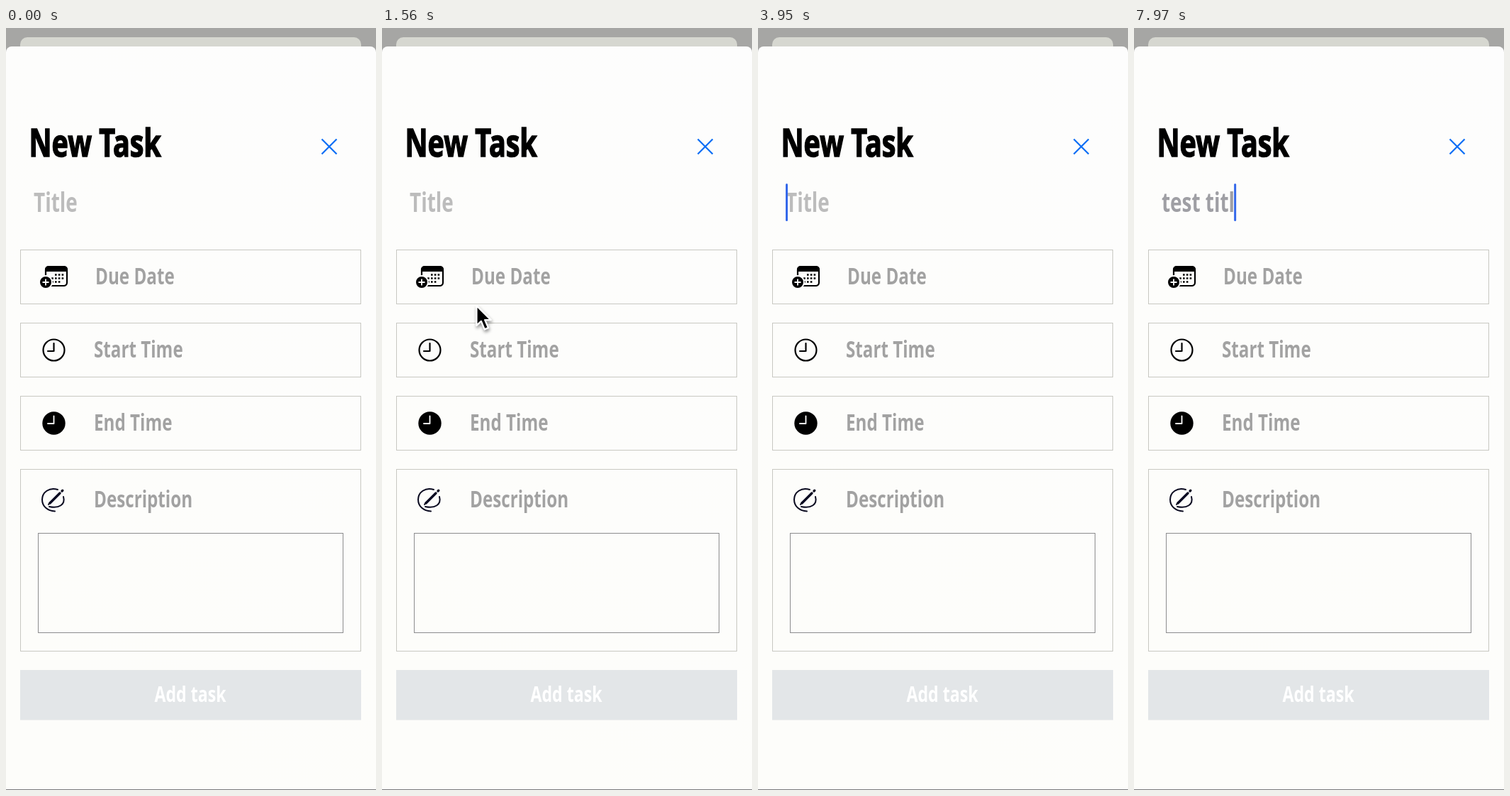
Recreate the animation shown at these times as an HTML page. Size 522 px wide and 1073 px high, loop 7.99 s.

```html
<!DOCTYPE html>
<html lang="en">
<head>
<meta charset="utf-8">
<title>New Task</title>
<style>
  html, body { margin: 0; width: 100%; height: 100%; overflow: hidden; background: #fdfdfd; }
  svg { display: block; width: 100%; height: 100%; }
  /* one condensed look shared by all type */
  text {
    font-family: "Noto Sans", "Open Sans", sans-serif;
    font-weight: 600;
    white-space: pre;
    transform: scaleX(.745);
    transform-box: fill-box;
    transform-origin: left;
  }
  .heading { font-size: 53px; font-weight: 800; stroke: #000; stroke-width: 1.6; }
  .field { font-size: 37.5px; }
  .label { font-size: 32.5px; fill: #a2a2a2; }
  .action { font-size: 31px; font-weight: 700; fill: #fff; text-anchor: middle; transform-origin: center; }
  .box { fill: none; stroke: #c8c8c2; }
  .line { fill: none; stroke: #000; stroke-width: 2.2; stroke-linecap: round; stroke-linejoin: round; }
  #pointer path { stroke: #fff; stroke-width: 2.4; stroke-linejoin: round; filter: drop-shadow(1px 3px 2px #0006); }
</style>
</head>
<body>
<svg viewBox="0 0 522 1073" preserveAspectRatio="none">
  <defs>
    <linearGradient id="sheet" x1="1" y1="0" x2=".6" y2="1">
      <stop offset="0" stop-color="#fdfdfd"/>
      <stop offset="1" stop-color="#fdfdfa"/>
    </linearGradient>
  </defs>

  <rect width="522" height="1073" fill="#a6a6a4"/>
  <rect x="20" y="13" width="481" height="30" rx="10" fill="#d6d7d0"/>
  <rect y="26" width="522" height="1060" rx="8" fill="url(#sheet)"/>
  <rect y="1072" width="522" height="1" fill="#77777a"/>

  <text class="heading" x="32.500" y="181">New Task</text>
  <path d="M445.500 156.500l21 21m0-21l-21 21" fill="none" stroke="#0a6df5" stroke-width="2.200"/>
  <text class="field" id="title" x="39" y="259"></text>
  <rect id="caret" y="219" width="3" height="53" rx="1.500" fill="#3468ea"/>

  <rect class="box" x="20.500" y="312.500" width="480" height="76"/>
  <rect class="box" x="20.500" y="415.500" width="480" height="76"/>
  <rect class="box" x="20.500" y="518.500" width="480" height="76"/>
  <rect class="box" x="20.500" y="621.500" width="480" height="256"/>
  <rect x="45.500" y="711.500" width="430" height="140" fill="none" stroke="#8c8c8e"/>

  <text class="label" x="126" y="361">Due Date</text>
  <text class="label" x="124" y="464">Start Time</text>
  <text class="label" x="124" y="567">End Time</text>
  <text class="label" x="124" y="675">Description</text>

  <g>
    <rect class="line" x="56" y="336" width="30" height="27" rx="4.500"/>
    <path d="M55 343v-3a5 5 0 0 1 5-5h22a5 5 0 0 1 5 5v3z"/>
    <path d="M69 347.500h13M64.200 352.500h18M64.200 357.500h14" fill="none" stroke="#000" stroke-width="2.600" stroke-dasharray="2.600 2.200"/>
    <circle cx="56" cy="358" r="9" stroke="#fdfdfd" stroke-width="2"/>
    <path d="M56 353.500v9m-4.500-4.500h9" stroke="#fff" stroke-width="1.800"/>
  </g>
  <g class="line">
    <circle cx="67.500" cy="453.500" r="15"/>
    <path d="M67.500 444v11h-8.500"/>
  </g>
  <circle cx="67.500" cy="556.500" r="16.200"/>
  <path class="line" d="M67.500 546.500v10.500h-8.500" style="stroke:#fff;stroke-width:1.800"/>
  <g class="line" style="stroke:#0a0a20;stroke-width:2">
    <path d="M73 650C61 646 51 654 51 664C51 674 59 680 69 680.500"/>
    <path d="M81 660C84 671 75 677 61 674"/>
    <path d="M62 669L76 655" stroke-width="3.400"/>
    <path d="M79 652l.8-.8" stroke-width="3.400"/>
    <path d="M60 671l2-3"/>
  </g>

  <rect x="20" y="904" width="481" height="70.500" fill="#e3e6e8"/>
  <text class="action" x="260" y="949">Add task</text>

  <g id="pointer"><path d="M0 0V28L6.500 22L11.300 33.500L16.600 31.200L11.800 20.200H20.300Z"/></g>
</svg>
<script>
  const LOOP = 7990, HIDE = 3340, FOCUS = 3000, KEY0 = 5270, KEY_STEP = 312, WORD = 'test titl';
  // time, x, y of the pointer tip
  const track = [[260, 345, 1080], [720, 252, 735], [1140, 180, 490], [1660, 124, 372],
                 [2080, 91, 293], [2680, 82, 233], [3400, 82, 233]];
  const $ = id => document.getElementById(id);
  const title = $('title'), caret = $('caret'), pointer = $('pointer');
  const clamp = v => Math.max(0, Math.min(1, v));

  const slope = (i, k) => {
    const a = track[Math.max(0, i - 1)], b = track[Math.min(track.length - 1, i + 1)];
    return i >= track.length - 2 ? 0 : (b[k] - a[k]) / (b[0] - a[0]);
  };

  // Hermite curve through the track points
  function along(t, k) {
    let i = 0;
    while (i < track.length - 2 && t > track[i + 1][0]) i++;
    const [a, b] = [track[i], track[i + 1]], d = b[0] - a[0];
    const u = clamp((t - a[0]) / d), v = 1 - u;
    return v * v * (1 + 2 * u) * a[k] + u * u * (3 - 2 * u) * b[k]
      + u * v * d * (v * slope(i, k) - u * slope(i + 1, k));
  }

  function caretAlpha(t) {
    if (t < FOCUS) return 0;
    if (t > KEY0) return 1;
    const p = (t - FOCUS) % 1000;
    return 1 - clamp((p - 500) / 150) + clamp((p - 800) / 150);
  }

  function draw(t) {
    const count = t < KEY0 ? 0 : Math.min(WORD.length, 1 + Math.floor((t - KEY0) / KEY_STEP));
    const text = count ? WORD.slice(0, count) : 'Title';
    if (title.textContent !== text) title.textContent = text;
    title.setAttribute('fill', count ? '#9f9fa4' : '#bcbcbc');
    caret.setAttribute('x', count ? title.getBoundingClientRect().right - 1 : 39);
    caret.setAttribute('opacity', caretAlpha(t));
    pointer.setAttribute('transform', `translate(${along(t, 1)} ${along(t, 2)})`);
    pointer.setAttribute('visibility', t > 250 && t < HIDE ? 'visible' : 'hidden');
  }

  const start = performance.now();
  function tick(now) {
    draw(Math.max(0, now - start) % LOOP);
    requestAnimationFrame(tick);
  }
  draw(0);
  requestAnimationFrame(tick);
</script>
</body>
</html>
```
